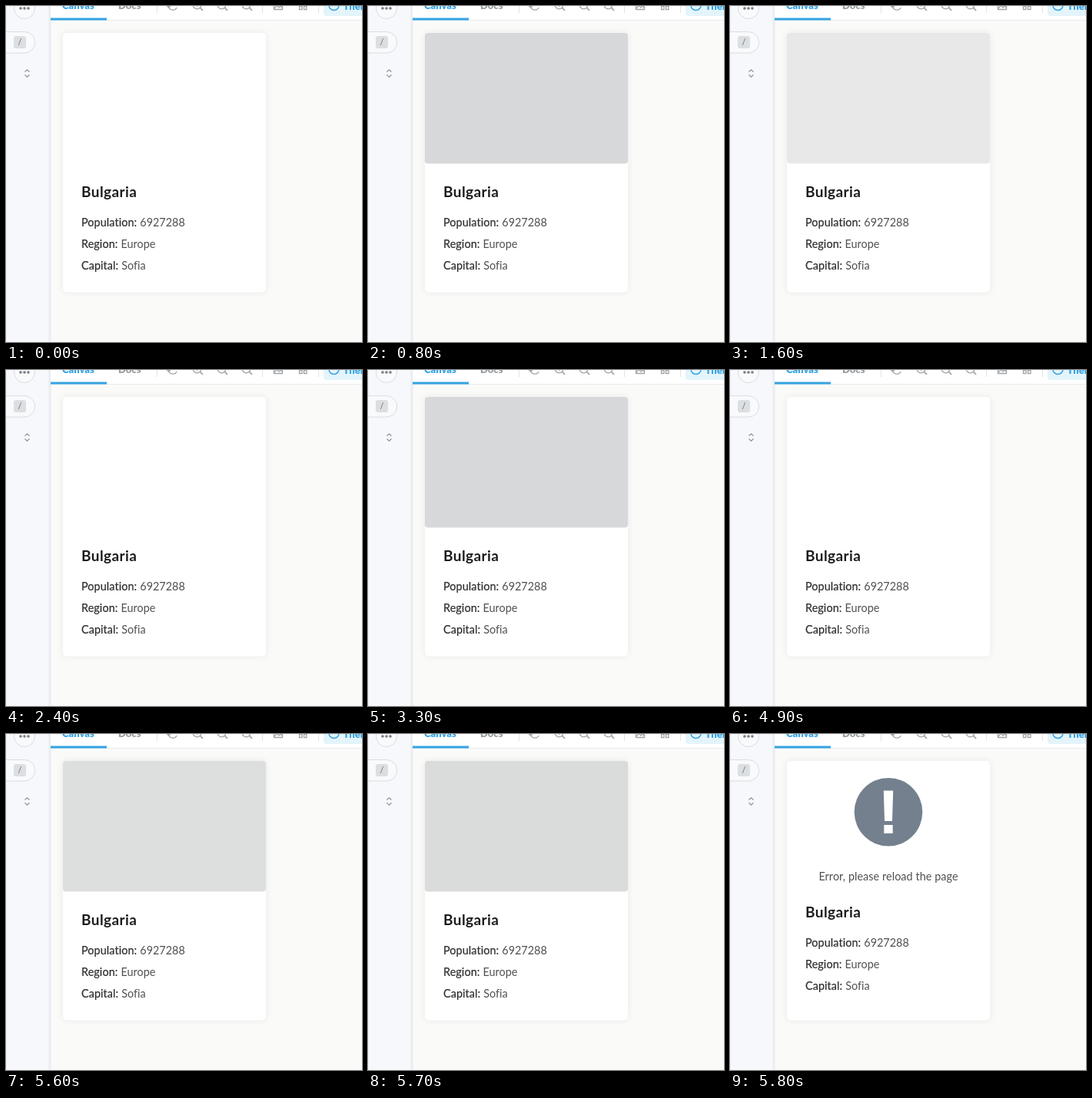
Animation of 463 by 436 pixels, one loop 8.2 s. Source, as an HTML page:

```html
<!DOCTYPE html>
<html lang="en">
<head>
<meta charset="utf-8">
<title>Country card loading</title>
<style>
  html, body { margin: 0; width: 100%; height: 100%; overflow: hidden; background: #fafaf9; }
  svg { display: block; width: 463px; height: 436px; font-family: Lato, "Open Sans", sans-serif; }
  text { font-variant-ligatures: none; }
  .card { fill: #fff; filter: drop-shadow(0 0 4px rgba(0, 0, 0, .07)); }
  .icon { fill: none; stroke: #a0a5a9; stroke-width: 1.3; }
  .tab { font-size: 13px; font-weight: 900; }
  .title { font-size: 19px; font-weight: 700; letter-spacing: .42px; fill: #1c1c1c; }
  .label { font-size: 14.4px; letter-spacing: .08px; fill: #2c2c2c; stroke: #2c2c2c; stroke-width: .18px; }
  .value { font-size: 14.4px; fill: #505050; }
</style>
</head>
<body>
<svg viewBox="0 0 463 436">
  <defs>
    <g id="lens">
      <circle cx="-1" cy="-1.5" r="5.3"/>
      <path d="M3 2.3 L6.6 5.8" stroke-width="1.7"/>
    </g>
  </defs>

  <rect width="463" height="436" fill="#fafaf9"/>

  <!-- sidebar -->
  <rect width="57" height="436" fill="#f6f8fc"/>
  <path d="M.5 0V436" stroke="#eceff3"/>
  <path d="M57 0V436" stroke="#e9ecf0" stroke-width="3"/>
  <circle cx="24" cy="3" r="13.5" fill="#f8fafc" stroke="#d9dde1"/>
  <g fill="#767d83">
    <circle cx="19" cy="3" r="1.8"/><circle cx="24" cy="3" r="1.8"/><circle cx="29" cy="3" r="1.8"/>
  </g>
  <path d="M0 33.5H24a13.75 13.75 0 0 1 0 27.5H0" fill="#f8fafc" stroke="#d9dde1"/>
  <rect x="10" y="39" width="16" height="16" rx="3" fill="#dcdfe2"/>
  <text x="18" y="51" font-size="11" text-anchor="middle" fill="#666d73">/</text>
  <path d="M24.5 85.5 27.5 82.7l3 2.8M24.5 89.3l3 2.8 3-2.8" fill="none" stroke="#8d9399" stroke-width="1.2"/>

  <!-- toolbar -->
  <rect x="58" width="405" height="18" fill="#fff"/>
  <path d="M58 18.5H463" stroke="#e8eaec"/>
  <rect x="58" y="15.5" width="73" height="3" fill="#36a3e3"/>
  <text class="tab" x="73" y="4" fill="#36a3e3">Canvas</text>
  <text class="tab" x="146" y="4" fill="#999ea2">Docs</text>
  <path d="M196.5 0V9M333.5 0V9M406.5 0V9" stroke="#e0e2e4"/>
  <g class="icon">
    <path d="M211.5 -1a5.6 5.6 0 0 0 10.6 3M209 -.5l2.6 2.5 2.6-2.5"/>
    <use href="#lens" x="249.5"/><use href="#lens" x="281.5"/><use href="#lens" x="313.5"/>
    <path d="M246 -1.5h5M248.5 -4v5M278 -1.5h5"/>
    <path d="M348.5 -5V4.5H359.5V-5M349 3l3.5-3.5 2.5 2.5 2-2 2.5 2.5"/>
    <path d="M381.5 .5h3.5v4h-3.5zM387.5 .5h3.5v4h-3.5z"/>
  </g>
  <rect x="413" y="-15" width="60" height="28" rx="4" fill="#e4f4fb"/>
  <circle cx="426.5" cy="-1" r="6.5" fill="none" stroke="#36a3e3" stroke-width="1.5"/>
  <text class="tab" x="438.5" y="4.5" fill="#36a3e3">Theme</text>

  <!-- card -->
  <rect class="card" x="74" y="35" width="264" height="336.5" rx="5"/>
  <rect id="skeleton" x="74" y="35" width="264" height="169.5" rx="4" fill="#d4d5d6"/>
  <g id="error">
    <circle cx="206" cy="101.3" r="44.3" fill="#74808e"/>
    <path d="M199.8 73.5H212.2L211 113H201zM200.3 118H211.7V129H200.3z" fill="#fff"/>
    <text class="value" x="206" y="190" text-anchor="middle" letter-spacing=".06">Error, please reload the page</text>
  </g>
  <g id="facts">
    <text class="title" x="98" y="247.5">Bulgaria</text>
    <text class="label" x="98" y="285.5">Population:</text>
    <text class="value" x="174.3" y="285.5">6927288</text>
    <text class="label" x="98" y="313.5">Region:</text>
    <text class="value" x="149.5" y="313.5">Europe</text>
    <text class="label" x="98" y="341.5">Capital:</text>
    <text class="value" x="150.3" y="341.5">Sofia</text>
  </g>
</svg>
<script>
  const LOOP = 8200, FAIL_AT = 5800, PULSE = 2500, TICK = 100;
  const [skeleton, error, facts] = ['skeleton', 'error', 'facts'].map(id => document.getElementById(id));

  const pulse = skeleton.animate([
    { opacity: 0, easing: 'ease' },
    { opacity: 1, easing: 'ease' },
    { opacity: 0 }
  ], { duration: PULSE, iterations: Infinity });
  pulse.pause();

  const show = (el, on) => el.setAttribute('visibility', on ? 'visible' : 'hidden');

  function draw(ms) {
    const t = Math.floor((ms % LOOP) / TICK) * TICK;
    const failed = t >= FAIL_AT;
    pulse.currentTime = t;
    show(skeleton, !failed);
    show(error, failed);
    facts.setAttribute('transform', `translate(0 ${failed ? -10 : 0})`);
  }

  const start = performance.now();
  function frame() {
    draw(performance.now() - start);
    requestAnimationFrame(frame);
  }
  frame();
</script>
</body>
</html>
```
